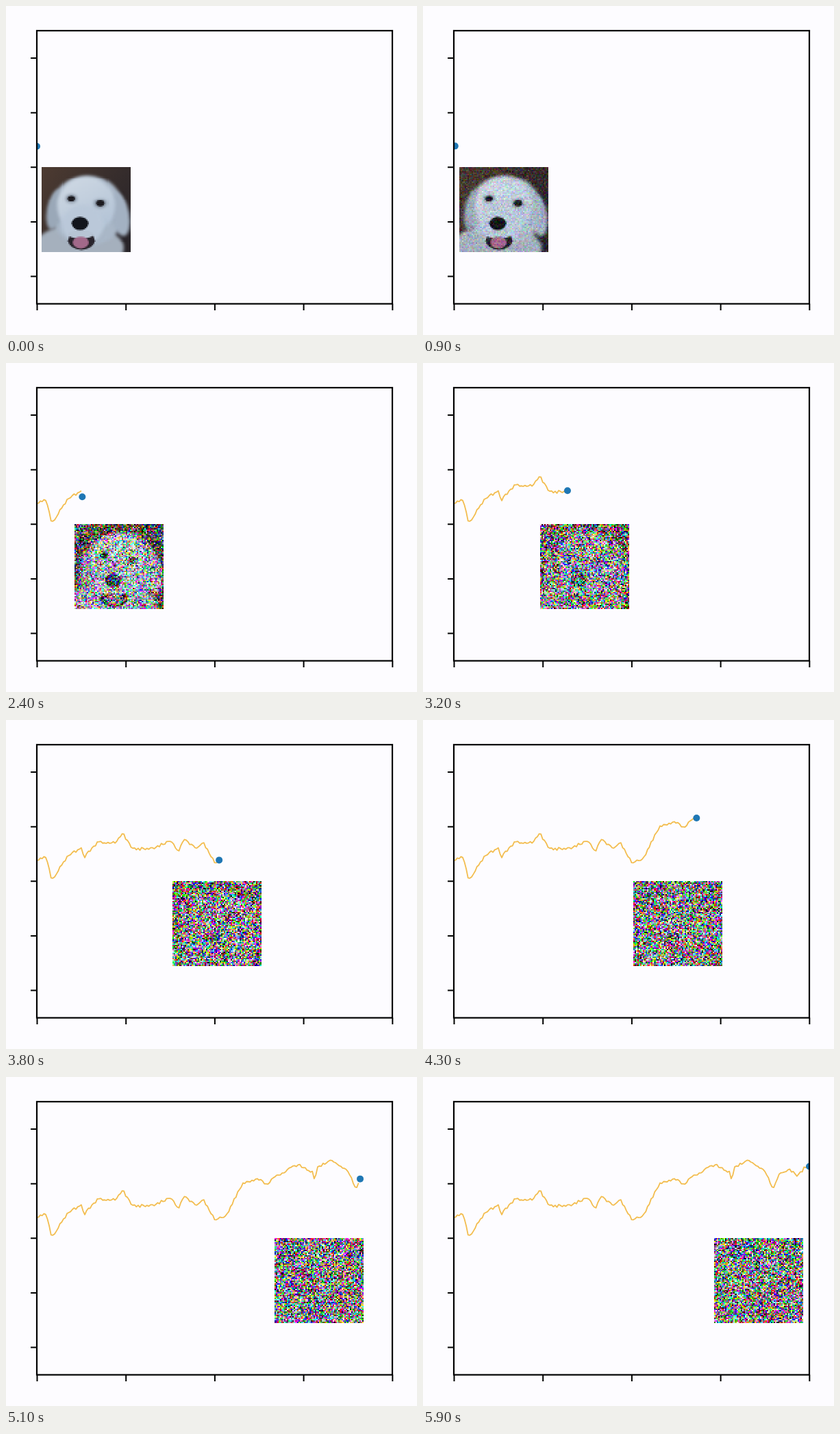
An HTML page with a canvas that plays this animation: 600x480 px, repeating every 6000 ms.

```html
<!DOCTYPE html>
<html lang="en">
<head>
<meta charset="utf-8">
<title>Noising walk</title>
<style>
  html, body { margin: 0; width: 100%; height: 100%; overflow: hidden; background: #fdfcff; }
  canvas { display: block; }
</style>
</head>
<body>
<canvas id="stage" width="600" height="480"></canvas>
<script>
const ctx = document.getElementById('stage').getContext('2d');
const FRAMES = 60, FRAME_MS = 100, SIZE = 64, STEPS = 200;
const LEFT = 45, RIGHT = 564, TOP = 36, BOTTOM = 434.5;
const STEP = (RIGHT - LEFT) / STEPS;

// Main turns of the walk; seeded jitter supplies the small wiggles
const turns = [
  [45, 204], [59, 200], [67, 234], [91, 197], [110, 188], [114, 200], [134, 178],
  [160, 179], [170, 165], [185, 188], [214, 188], [241, 175], [252, 192], [260, 174],
  [276, 187], [289, 180], [304, 207], [320, 205], [345, 156], [371, 148], [380, 158],
  [395, 144], [426, 128], [447, 138], [450, 150], [455, 132], [476, 121], [500, 139],
  [511, 164], [520, 142], [535, 135], [547, 145], [557, 132], [564, 132]
];

function seededRandom(seed) {
  return () => {
    seed = seed + 0x6d2b79f5 | 0;
    let r = Math.imul(seed ^ seed >>> 15, 1 | seed);
    r = r + Math.imul(r ^ r >>> 7, 61 | r) ^ r;
    return ((r ^ r >>> 14) >>> 0) / 2 ** 32;
  };
}

function turnY(x) {
  const i = Math.max(1, turns.findIndex(([tx]) => tx >= x));
  const [x0, y0] = turns[i - 1], [x1, y1] = turns[i];
  return y0 + (y1 - y0) * (x - x0) / (x1 - x0);
}

const jitter = seededRandom(5);
const walk = Array.from({ length: STEPS + 1 }, (_, i) => {
  const x = LEFT + i * STEP;
  return { x, y: turnY(x) + (jitter() - 0.5) * 4 };
});

function progress(frame) {
  const p = frame / (FRAMES - 1);
  const sine = Math.sin(p * Math.PI / 2) ** 4;
  const smooth = (p * p * (3 - 2 * p)) ** 2;
  return 0.7 * sine + 0.3 * smooth;
}

function makeTile() {
  const tile = document.createElement('canvas');
  tile.width = tile.height = SIZE;
  return tile.getContext('2d', { willReadFrequently: true });
}

// Soft, simplified dog portrait in a 130 x 124 space
function paintDog() {
  const g = makeTile();
  const shade = (x0, y0, x1, y1, from, to) => {
    const grad = g.createLinearGradient(x0, y0, x1, y1);
    grad.addColorStop(0, from);
    grad.addColorStop(1, to);
    return grad;
  };
  const blob = (x, y, rx, ry, fill, turn = 0) => {
    g.fillStyle = fill;
    g.beginPath();
    g.ellipse(x, y, rx, ry, turn, 0, Math.PI * 2);
    g.fill();
  };
  g.scale(SIZE / 130, SIZE / 124);
  g.fillStyle = shade(0, 0, 130, 90, '#4d3b31', '#282429');
  g.fillRect(0, 0, 130, 124);
  g.filter = 'blur(1px)';
  blob(54, 118, 66, 34, '#a5b0bd');
  blob(67, 64, 54, 52, '#a9b7c7');
  blob(20, 62, 12, 30, '#9aa8b8', 0.2);
  blob(114, 69, 14, 32, '#a3b1c2', -0.2);
  blob(65, 56, 42, 42, shade(40, 14, 90, 105, '#ced8e3', '#afc0d4'));
  blob(60, 84, 31, 28, '#bac8d9');
  blob(43, 46, 8, 6, '#788493');
  blob(86, 53, 9, 6, '#788493');
  g.filter = 'blur(0.3px)';
  blob(43, 46, 5.5, 4.5, '#1d1b20');
  blob(86, 53, 6, 4.5, '#1d1b20');
  blob(58, 107, 20, 14, '#29242c');
  blob(57, 98, 19, 6, '#b7c4d4');
  blob(57, 110, 12, 9, '#a2698a');
  blob(56, 82, 12.5, 10, '#12151c');
  return g.getImageData(0, 0, SIZE, SIZE);
}

const dog = paintDog();
const noisy = makeTile();
const pixels = noisy.createImageData(SIZE, SIZE);

function addNoise(amount, seed) {
  const keep = Math.exp(-5.7 * amount);
  const signal = Math.sqrt(keep), sigma = Math.sqrt(1 - keep);
  const random = seededRandom(seed * 7919);
  const normal = () => Math.sqrt(-2 * Math.log(1 - random())) * Math.cos(2 * Math.PI * random());
  for (let i = 0; i < pixels.data.length; i++) {
    const value = dog.data[i] / 127.5 - 1;
    pixels.data[i] = i % 4 === 3 ? 255 : (signal * value + sigma * normal() + 1) * 127.5;
  }
  noisy.putImageData(pixels, 0, 0);
}

function drawAxes() {
  ctx.strokeStyle = '#000';
  ctx.lineWidth = 2.2;
  ctx.strokeRect(LEFT, TOP, RIGHT - LEFT, BOTTOM - TOP);
  ctx.lineWidth = 2;
  ctx.beginPath();
  for (let i = 0; i < 5; i++) {
    const x = 45.5 + i * 129.7, y = 76 + i * 79.65;
    ctx.moveTo(x, BOTTOM);
    ctx.lineTo(x, 444);
    ctx.moveTo(36, y);
    ctx.lineTo(LEFT, y);
  }
  ctx.stroke();
}

function drawWalk(amount) {
  const last = Math.round(amount * STEPS);
  const head = walk[last];
  ctx.save();
  ctx.beginPath();
  ctx.rect(LEFT, TOP, RIGHT - LEFT, BOTTOM - TOP);
  ctx.clip();
  ctx.strokeStyle = '#f3bd4f';
  ctx.lineWidth = 1.8;
  ctx.lineJoin = 'round';
  ctx.beginPath();
  for (const { x, y } of walk.slice(0, last)) ctx.lineTo(x, y);
  ctx.stroke();
  ctx.fillStyle = '#1f77b4';
  ctx.beginPath();
  ctx.arc(LEFT + amount * (RIGHT - LEFT), head.y, 5, 0, Math.PI * 2);
  ctx.fill();
  ctx.restore();
}

function draw(frame) {
  const amount = progress(frame);
  ctx.fillStyle = '#fdfcff';
  ctx.fillRect(0, 0, 600, 480);
  drawWalk(amount);
  addNoise(amount, frame);
  ctx.imageSmoothingEnabled = false;
  ctx.drawImage(noisy.canvas, Math.round(52 + amount * 373.4), 235, 130, 124);
  drawAxes();
}

let shown = -1;
function tick() {
  const frame = Math.floor(performance.now() / FRAME_MS) % FRAMES;
  if (frame !== shown) draw(shown = frame);
  requestAnimationFrame(tick);
}
tick();
</script>
</body>
</html>
```
